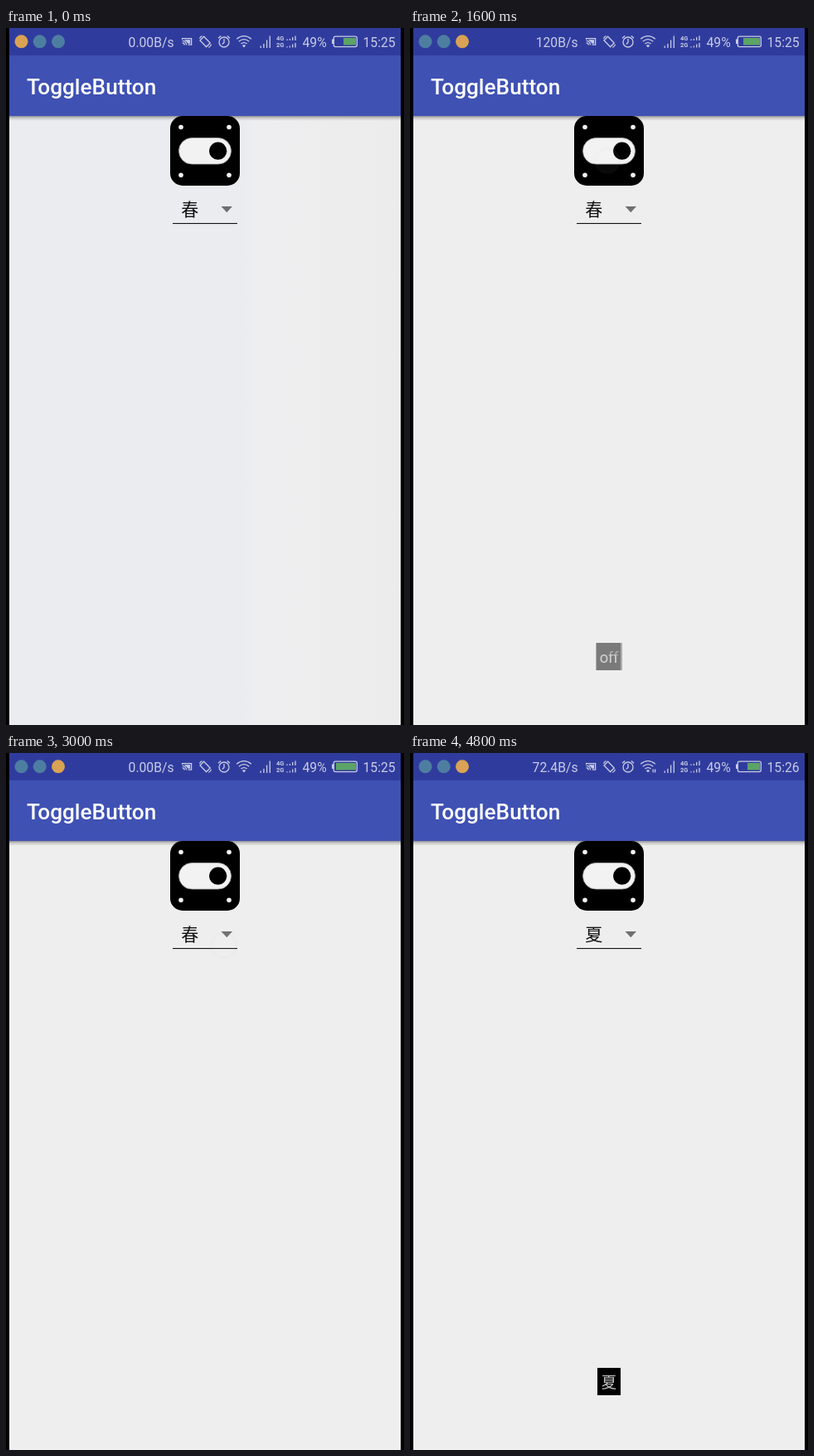
An HTML page that plays this animation: 480x840 px, repeating every 4.9 s.

```html
<!DOCTYPE html>
<html lang="en">
<head>
<meta charset="utf-8">
<title>ToggleButton</title>
<style>
html, body { margin: 0; width: 100%; height: 100%; overflow: hidden; background: #000; }
svg { display: block; }
text { font-family: Roboto, "Noto Sans", sans-serif; }
.cjk { font: 21px "Noto Sans CJK SC", "Noto Sans CJK", sans-serif; fill: #111; text-anchor: middle; }
.status text { font-size: 15.7px; fill: #c8cce6; }
.line { fill: none; stroke: #c8cce6; stroke-width: 1.3; }
.solid { fill: #c8cce6; }
.toast text { font-size: 18.4px; fill: #c2c2c2; text-anchor: middle; }
.touch { fill: rgba(255,255,255,.6); stroke: rgba(190,184,230,.9); stroke-width: 2; }

/* Percentages are multiples of 100 ms in a 4.9 s loop */
.a { animation: 4.9s step-end infinite; }
.tint { animation-name: tint; }
.knob { animation-name: knob; }
.fill { animation-name: charge; }
.idle { animation-name: idle; }
.slow { animation-name: slow; }
.fast { animation-name: fast; }
.late { animation-name: late; }
.early { animation-name: early; }
.traffic { animation-name: traffic; }
.before { animation-name: before; }
.after { animation-name: after; }
.on { animation-name: on; }
.off { animation-name: off; }
.summer { animation-name: summer; }
.popup { animation-name: popup; }
.tap1 { animation-name: tap1; }
.tap2 { animation-name: tap2; }
.tap3 { animation-name: tap3; }
.tap4 { animation-name: tap4; }
.first { animation-name: first; }
.last { animation-name: last; }

@keyframes tint { 0% { opacity: 1 } 2.04%, 100% { opacity: 0 } }
@keyframes knob {
  0% { transform: translateX(0) } 6.12% { transform: translateX(-31.5px) }
  30.61%, 100% { transform: translateX(0) }
}
@keyframes charge {
  0% { transform: translateX(10px) } 6.12% { transform: translateX(9px) }
  14.28% { transform: translateX(8px) } 20.4% { transform: translateX(7px) }
  30.61% { transform: translateX(6px) } 32.65% { transform: translateX(5px) }
  42.85% { transform: translateX(4px) } 48.97% { transform: translateX(3px) }
  53.06% { transform: translateX(2px) } 59.18% { transform: translateX(1px) }
  65.3% { transform: translateX(0) } 89.79% { transform: translateX(11px) }
  97.95%, 100% { transform: translateX(10px) }
}
@keyframes idle { 0% { opacity: 1 } 6.12% { opacity: 0 } 42.85% { opacity: 1 } 85.71%, 100% { opacity: 0 } }
@keyframes slow { 0% { opacity: 0 } 6.12% { opacity: 1 } 42.85%, 100% { opacity: 0 } }
@keyframes fast { 0% { opacity: 0 } 85.71%, 100% { opacity: 1 } }
@keyframes late { 0% { opacity: 0 } 85.71%, 100% { opacity: 1 } }
@keyframes early { 0% { opacity: 1 } 85.71%, 100% { opacity: 0 } }
@keyframes traffic { 0% { opacity: 0 } 6.12% { opacity: 1 } 18.36% { opacity: 0 } 85.71%, 100% { opacity: 1 } }
@keyframes before { 0% { opacity: 1 } 83.67%, 100% { opacity: 0 } }
@keyframes after { 0% { opacity: 0 } 83.67%, 100% { opacity: 1 } }
@keyframes first { 0% { fill: #d9a254 } 18.36%, 100% { fill: #4d7ea2 } }
@keyframes last { 0% { fill: #4d7ea2 } 18.36%, 100% { fill: #d9a254 } }
@keyframes on {
  0% { opacity: 0 } 8.16% { opacity: .35 } 10.2% { opacity: .72 } 12.24% { opacity: .95 }
  14.28% { opacity: 1 } 30.61% { opacity: .75 } 32.65% { opacity: .3 } 34.69%, 100% { opacity: 0 }
}
@keyframes off {
  0% { opacity: 0 } 32.65% { opacity: .26 } 34.69% { opacity: .6 } 36.73% { opacity: .88 }
  38.77% { opacity: 1 } 53.06% { opacity: .91 } 55.1% { opacity: .55 } 57.14% { opacity: .18 }
  59.18%, 100% { opacity: 0 }
}
@keyframes summer {
  0% { opacity: 0 } 85.71% { opacity: .25 } 87.75% { opacity: .65 } 89.79% { opacity: .92 }
  91.83%, 100% { opacity: 1 }
}
@keyframes popup {
  0% { opacity: 0 } 63.26% { opacity: .6 } 65.3% { opacity: 1 } 83.67% { opacity: .5 }
  85.71%, 100% { opacity: 0 }
}
@keyframes tap1 { 0% { opacity: 0 } 2.04% { opacity: .8 } 8.16% { opacity: .1 } 10.2%, 100% { opacity: 0 } }
@keyframes tap2 { 0% { opacity: 0 } 28.57% { opacity: .8 } 32.65% { opacity: .06 } 34.69%, 100% { opacity: 0 } }
@keyframes tap3 { 0% { opacity: 0 } 57.14% { opacity: .7 } 61.22% { opacity: .07 } 63.26%, 100% { opacity: 0 } }
@keyframes tap4 { 0% { opacity: 0 } 79.59% { opacity: .85 } 83.67% { opacity: .1 } 85.71%, 100% { opacity: 0 } }
</style>
</head>
<body>
<svg width="100%" height="100%" viewBox="0 0 480 840">
  <defs>
    <linearGradient id="cool">
      <stop offset="0" stop-color="#ebecef"/><stop offset=".6" stop-color="#ebecf0"/>
      <stop offset=".62" stop-color="#eeeef0"/><stop offset="1" stop-color="#ececec"/>
    </linearGradient>
    <linearGradient id="drop" x2="0" y2="1">
      <stop offset="0" stop-opacity=".38"/><stop offset=".45" stop-opacity=".14"/><stop offset="1" stop-opacity="0"/>
    </linearGradient>
    <filter id="lift" x="-40%" y="-10%" width="180%" height="125%">
      <feDropShadow dx="0" dy="5" stdDeviation="5" flood-opacity=".34"/>
    </filter>
  </defs>

  <rect width="480" height="840" fill="#000"/>
  <rect x="4" width="472" height="840" fill="#eee"/>
  <rect class="a tint" x="4" y="106" width="472" height="734" fill="url(#cool)"/>
  <rect x="4" y="106" width="472" height="6" fill="url(#drop)"/>
  <rect x="4" width="472" height="106" fill="#3f51b3"/>
  <rect x="4" width="472" height="33" fill="#303c9d"/>
  <text x="25" y="79.5" font-size="26.2" font-weight="500" fill="#fff">ToggleButton</text>

  <g class="status">
    <circle class="a first" cx="18.5" cy="16.3" r="8"/>
    <circle cx="40.7" cy="16.3" r="8" fill="#4d7ea2"/>
    <circle class="a last" cx="63" cy="16.3" r="8"/>

    <g text-anchor="end">
      <text class="a idle" x="202.5" y="23">0.00B/s</text>
      <text class="a slow" x="202.5" y="23">120B/s</text>
      <text class="a fast" x="202.5" y="23">72.4B/s</text>
    </g>

    <!-- cast -->
    <path class="line" d="M212.6 14v-1.4h11v7.6h-4M212.6 15.4a5 5 0 0 1 5 5M212.6 17.8a2.6 2.6 0 0 1 2.6 2.6"/>
    <path class="solid" d="M215.5 14.2h6.6v4.6h-2.8q-.8-3-3.8-3.6z"/>
    <!-- rotation -->
    <path class="line" d="M238.6 10.2l7.6 7.8-4.6 4.8-7.6-7.8zM233.6 13q.4-2.6 3-3.4M247.4 19.6q-.4 2.8-3.2 3.8"/>
    <!-- alarm -->
    <circle class="line" cx="263" cy="17" r="6"/>
    <path class="line" d="M263 13v4.4l-2.2 2M256 12.2l3.2-2.8M270 12.2l-3.2-2.8"/>
    <!-- wifi -->
    <path class="line" d="M278.2 13.2q8.8-7.2 17.6 0M280.8 16.2q6.2-5 12.4 0M283.4 19q3.6-2.8 7.2 0"/>
    <path class="solid" d="M284.8 21q2.2-1.6 4.4 0l-2.2 2.6z"/>
    <path class="a traffic line" stroke-width="1" d="M293.2 23.5v-4M295.6 19.5v4"/>
    <!-- signal -->
    <path class="line" stroke-width="2" d="M307.2 24v-2.4M310.9 24v-5M314.6 24v-9.5M318.3 24v-14.6"/>
    <g font-weight="700">
      <text x="326" y="15" style="font-size:7.4px">4G</text>
      <text x="326" y="23.3" style="font-size:7.4px">2G</text>
    </g>
    <path class="line" d="M339 15v-1.4M342.4 15v-2M345.7 15v-4M349 15v-5.6M339 23.6v-1.4M342.4 23.6v-2M345.7 23.6v-4M349 23.6v-5.6"/>

    <text x="357.5" y="23">49%</text>
    <!-- battery -->
    <rect class="line" x="395.3" y="10.2" width="28" height="12.4" rx="2"/>
    <rect class="solid" x="393" y="13.5" width="2" height="5.5"/>
    <svg x="397" y="12" width="25" height="8.5">
      <rect class="a fill" width="25" height="8.5" fill="#5ca466"/>
    </svg>
    <text class="a early" x="430.5" y="23">15:25</text>
    <text class="a late" x="430.5" y="23">15:26</text>
  </g>

  <!-- toggle -->
  <rect x="198" y="106" width="84" height="84" rx="15"/>
  <g fill="#f2f2f2">
    <circle cx="211" cy="119.5" r="2.8"/><circle cx="269" cy="119.5" r="2.8"/>
    <circle cx="211" cy="177.2" r="2.8"/><circle cx="269" cy="177.2" r="2.8"/>
    <rect x="208.5" y="132.5" width="63" height="31.5" rx="15.75" stroke="#aaa" stroke-width=".8"/>
  </g>
  <circle class="a knob" cx="255.7" cy="148.2" r="10.6"/>

  <!-- spinner -->
  <text class="a before cjk" x="221.7" y="226.2">春</text>
  <text class="a after cjk" x="221.7" y="226.2">夏</text>
  <path d="M259.5 215h13.5l-6.75 7.2z" fill="#6f6f6f"/>
  <rect x="201" y="235" width="78" height="1.1" fill="#111"/>

  <g class="a popup">
    <rect x="201" y="204" width="57.3" height="251.5" rx="2" fill="#eee" filter="url(#lift)"/>
    <text class="cjk" x="221.7" y="242">春</text>
    <text class="cjk" x="221.7" y="305">夏</text>
    <text class="cjk" x="221.7" y="368">秋</text>
    <text class="cjk" x="221.7" y="431">冬</text>
  </g>

  <g class="toast">
    <g class="a on"><rect x="225" y="741" width="29" height="33"/><text x="239.7" y="765">on</text></g>
    <g class="a off"><rect x="224" y="741" width="32" height="33"/><text x="240" y="765">off</text></g>
    <g class="a summer">
      <rect x="226" y="741" width="28" height="33"/>
      <text x="240" y="765" style="font-family:'Noto Sans CJK SC','Noto Sans CJK',sans-serif">夏</text>
    </g>
  </g>

  <circle class="a tap1 touch" cx="238" cy="159" r="14.5"/>
  <circle class="a tap2 touch" cx="238" cy="160" r="14.5"/>
  <circle class="a tap3 touch" cx="263" cy="232" r="14.5"/>
  <circle class="a tap4 touch" cx="234" cy="301" r="14.5"/>
</svg>
</body>
</html>
```
